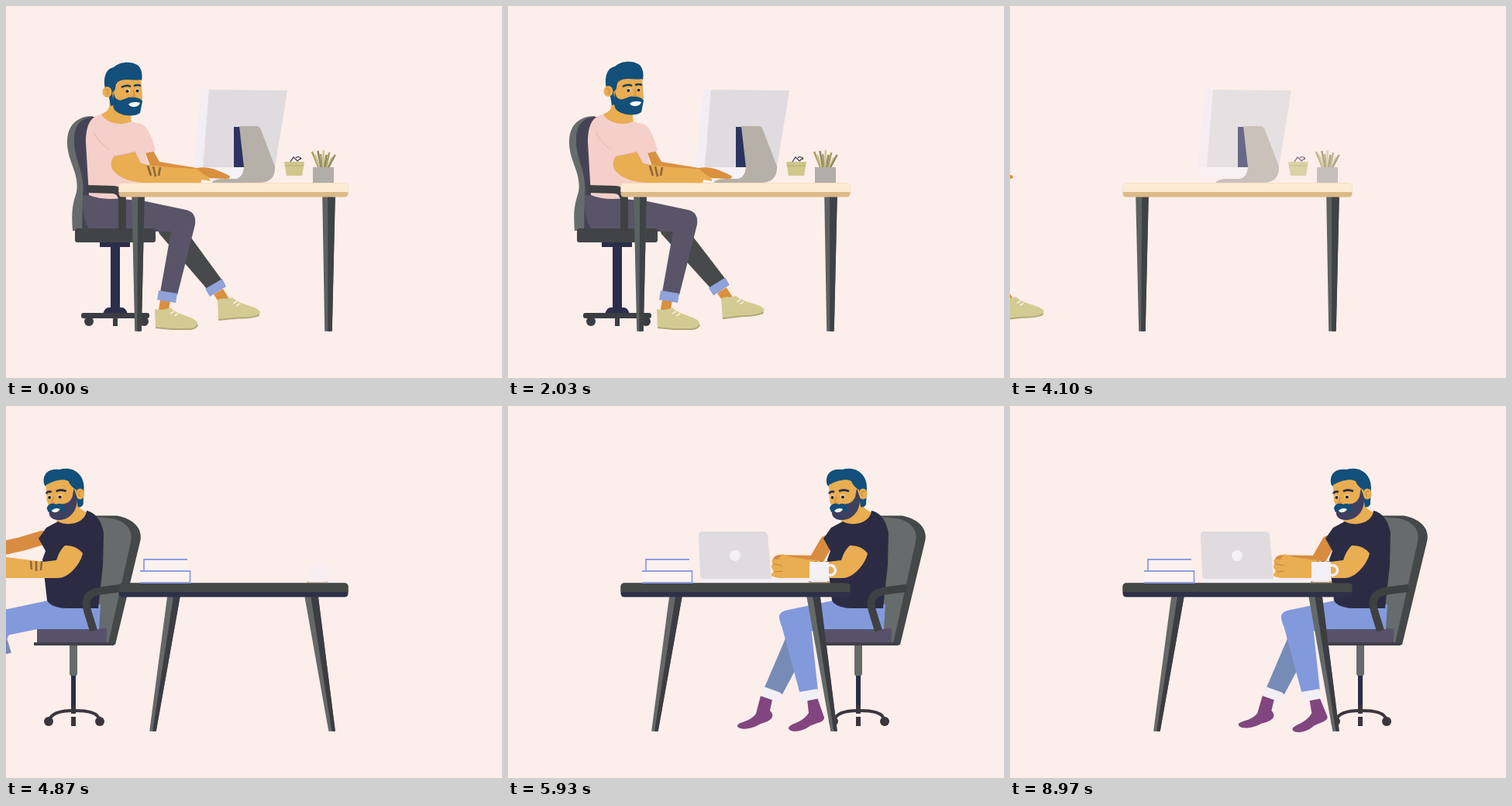
Animation of 640 by 480 pixels, one loop 9010 ms. Source, as an HTML page:

```html
<!DOCTYPE html>
<html lang="en">
<head>
<meta charset="utf-8">
<title>Two desks</title>
<style>
html, body { margin: 0; width: 100%; height: 100%; overflow: hidden; background: #fceeea; }
svg { display: block; width: 640px; height: 480px; }
</style>
</head>
<body>
<svg viewBox="0 0 640 480">
  <g id="monitor">
    <path fill="#f7f2f6" d="M242 207 H309 L304 222 H245 Z"/>
    <path fill="#f3edf4" d="M252 107 H263 L254 208 H242 Z"/>
    <path fill="#dfdbdf" d="M262 108 L363 109 L347 208 H254 Z"/>
    <path fill="#2b3460" d="M294 156 H304 L308 208 H294 Z"/>
    <path fill="#b6b0a8" d="M301 155 H324 Q328 156 329 160 L347 207 Q348 228 326 228 H265 Q268 223 282 223 H297 Q306 221 307 208 Z"/>
  </g>

  <g id="manA">
    <path fill="#666c6b" d="M112 142 C90 142 78 156 79 178 C80 202 95 216 91 240 C86 256 84 264 86 290 H104 V228 Z"/>
    <path fill="#454457" d="M112 143 C94 144 87 158 88 176 C89 202 102 214 99 244 L98 290 H120 L176 166 C174 150 152 142 112 143 Z"/>
    <g fill="#2b2e4b">
      <path d="M121 304 H160 V311 H121 Z M135 310 H147 V391 H135 Z"/>
      <path d="M125 398 Q127 389 133 389 H149 Q155 389 157 398 Z"/>
    </g>
    <g fill="#3b3d42">
      <rect x="97" y="396" width="88" height="7" rx="3"/><rect x="138" y="402" width="6" height="11"/>
      <circle cx="107" cy="407" r="6"/><circle cx="178" cy="407" r="6"/>
    </g>
    <g id="legA">
      <path fill="#48494a" d="M194 284 H228 L279 354 L260 366 L198 294 Z"/>
      <path fill="#d9903f" d="M268 372 L280 365 L288 378 L275 383 Z"/>
      <path fill="#d3cb93" d="M273 379 C279 376 286 379 292 376 C301 386 325 387 328 395 L326 401 L274 405 Z"/>
      <path fill="none" stroke="#b3a879" stroke-width="2" d="M274 405 L300 402.500 Q320 403 327 398"/>
      <path fill="none" stroke="#fbefdc" stroke-width="1.500" d="M293 384 L298 381 M297 387 L302 384"/>
      <path fill="#8fa2d9" d="M257 365 L279 352 L284 362 L263 375 Z"/>
    </g>
    <path fill="#d9903f" d="M199 379 H212 L210 392 H197 Z"/>
    <path fill="#d3cb93" d="M192 391 Q202 394 212 389 C220 399 246 401 247 409 L245 416 H193 Z"/>
    <path fill="none" stroke="#b3a879" stroke-width="2" d="M193 415 L214 417 H238 Q246 416 247 411"/>
    <path fill="none" stroke="#fbefdc" stroke-width="1.500" d="M212 397 L217 394 M217 400 L222 397"/>
    <path fill="#595468" d="M99 244 L180 252 L232 263 Q246 266 244 282 L221 373 L199 369 L213 291 H112 Q98 284 99 244 Z"/>
    <path fill="#8fa2d9" d="M197 367 L221 371 L219 383 L195 379 Z"/>
    <g id="backArmA">
      <path fill="#d9903f" d="M179 187 L190 187 L198 201 L246 209 C262 206 276 213 288 219 Q291 223 284 223 L262 222 L244 218 L188 212 Z"/>
    </g>
    <path fill="#e9ad52" d="M135 112 L133 131 C131 136 127 138 122 140 C128 152 150 156 162 150 L159 128 Z"/>
    <path fill="#f5cfca" d="M123 140 C109 142 103 154 103 176 L107 244 Q125 251 147 248 L186 230 L183 204 L180 190 L193 187 C189 170 182 153 173 152 L161 149 C150 155 130 152 123 140 Z"/>
    <path fill="none" stroke="#e2b4b0" stroke-width="1" d="M113 163 Q120 176 133 185 M144 180 Q153 179 160 188"/>
    <g id="headA">
      <path fill="#124f7a" d="M128 107 C125 92 129 81 139 79 C146 72 160 71 167 75 C174 77 177 87 175 96 L158 98 L142 101 L139 128 L135 129 L132 112 Z"/>
      <path fill="#e9ad52" d="M143 99 C151 92 162 97 174 95 C175 104 176 115 176 123 L164 134 L139 127 L137 112 C141 110 142 104 143 99 Z"/>
      <ellipse cx="130.500" cy="111" rx="6" ry="7" fill="#e9ad52"/>
      <path fill="none" stroke="#d98f3f" stroke-width="1.500" d="M128 108 C132 106 133 111 130 115"/>
      <path fill="#124f7a" d="M139 111 C140 119 144 123 150 121 L158 118 C165 117 174 118 176 123 L173 138 C165 144 147 142 140 134 C137 129 138 120 139 111 Z"/>
      <path fill="#fff6f1" d="M158 127 C162 123 169 124 173 125 C171 131 162 132 158 127 Z"/>
      <path fill="none" stroke="#173b5c" stroke-width="2.500" d="M149 105 Q155 101 161 104 M165 103 Q170 101 174 103"/>
      <g fill="#f8e6cf"><circle cx="157" cy="109.500" r="2.800"/><circle cx="169.500" cy="109" r="2.500"/></g>
      <g fill="#26242e"><circle cx="156.500" cy="110" r="2.100"/><circle cx="169.500" cy="109.500" r="2"/></g>
      <path fill="none" stroke="#d98f3f" stroke-width="1.500" d="M164 109 L166 116 L162 117"/>
    </g>
    <rect x="89" y="287" width="104" height="18" rx="3" fill="#424346"/>
    <path fill="none" stroke="#3f4042" stroke-width="10" d="M104 236 L138 237 Q150 238 150 252 V290"/>
    <g id="frontArmA">
      <path fill="#fbf4f3" d="M250 228 Q252 220 260 221 Q267 223 266 228 Z"/>
      <path fill="#e9ad52" d="M146 186 C136 195 133 204 138 212 C147 223 164 228 181 228 H240 C247 230 253 229 252 224 L263 226 Q264 221 256 218 L246 210 C222 209 194 207 174 203 L166 187 Z"/>
      <path fill="none" stroke="#8c683d" stroke-width="2.600" d="M183 206 L187 219 M190 207 L193 220 M199 208 L197 219"/>
    </g>
    <path fill="#f5cfca" d="M133 183 L140 194 L167 188 L158 172 Z"/>
    <path fill="none" stroke="#e2b4b0" stroke-width="1" d="M140 194 L167 188"/>
  </g>

  <g id="manB">
    <path fill="#454849" d="M478 141.500 L508 141.500 C531 146 542 159 538 175 L506 308 H488 Z"/>
    <path fill="#666b6b" d="M478 143 L502 145 C520 149 529 160 526 175 L497 306 H484 Z"/>
    <path fill="#666b6b" d="M447 308 H457 V346 L455 349 H449 L447 346 Z"/>
    <path fill="#2a2d48" d="M449 348 H455 V387 H449 Z"/>
    <path fill="none" stroke="#3b353c" stroke-width="4" d="M421 405 C424 395 438 393 452 393 C470 393 484 395 486 406"/>
    <g fill="#3b353c"><circle cx="420" cy="407" r="6"/><circle cx="486" cy="407" r="6"/><path d="M449 386 H455 V397 H449 Z M449 401 H455 V413 H449 Z"/></g>
    <path fill="#57526a" d="M405 287 H495 V306 H405 Z"/>
    <path fill="#423f4b" d="M401 305 H504 V309 H401 Z"/>
    <g id="calfBack">
      <g id="footBack">
        <path fill="#81467f" d="M326 374 L341 379 L338 393 C345 400 341 406 326 410 C311 419 296 418 296 412 C299 407 312 408 320 397 Z"/>
      </g>
      <path fill="#768cb6" d="M358 300 L386 312 L354 372 L331 363 Z"/>
      <path fill="#f2f0f5" d="M330 362 L352 370 L349 382 L326 374 Z"/>
    </g>
    <g id="calfFront">
      <g id="footFront">
        <path fill="#81467f" d="M386 378 L399 376 L408 402 C408 409 395 409 388 414 C378 421 362 422 362 415 C365 409 380 409 388 396 Z"/>
      </g>
      <path fill="#8299dc" d="M350 272 Q352 265 362 265 L391 284 L400 368 L377 372 Z"/>
      <path fill="#f2f0f5" d="M376 369 L399 365 L403 377 L378 382 Z"/>
    </g>
    <path fill="#8299dc" d="M350 272 Q350 265 362 263 L424 250 L487 256 L485 288 H405 L366 296 Q351 288 350 272 Z"/>
    <path id="backArmB" fill="none" stroke="#d88c40" stroke-width="18" stroke-linejoin="round" stroke-linecap="round"/>
    <path fill="#e9ad52" d="M454 112 L457 127 Q461 135 472 138 L466 154 L440 157 L430 149 L438 125 Z"/>
    <path fill="#2b2c43" d="M432 149 L417 157 L407 171 L416 187 L412 198 L418 251 Q424 262 450 261 L484 261 L490 205 L491 164 C488 145 478 137 469 135 C468 149 448 157 432 149 Z"/>
    <g id="headB">
      <path fill="#124f7a" d="M411 98 C410 87 418 80 431 82 C450 77 463 89 463 105 L462 127 Q459 132 455 130 L451 107 C446 104 441 95 434 96 C426 98 418 98 415 104 Q411 103 411 98 Z"/>
      <path fill="#e9ad52" d="M414 102 C424 96 437 93 443 97 C446 104 450 107 453 108 L453 122 L438 140 L420 136 L415 122 Z"/>
      <ellipse cx="458" cy="113.500" rx="5.500" ry="7" fill="#e9ad52"/>
      <path fill="none" stroke="#d98f3f" stroke-width="1.500" d="M460 110 C456 109 455 114 458 117"/>
      <path fill="#3d405e" d="M450 106 L454 118 C455 131 449 142 438 146 C428 149 419 146 418 139 L418 134 L430 126 C440 128 446 123 448 117 Z"/>
      <path fill="#124f7a" d="M415 132 C417 125 424 125 427 127 C433 124 439 129 439 137 L430 134 L417 137 Z"/>
      <path fill="#fff6f1" d="M421 135 Q426 130 432 133 Q430 138 423 137 Z"/>
      <path fill="none" stroke="#2b3148" stroke-width="2.800" d="M414 113 Q417 109 421 111 M427 110 Q433 107 440 110"/>
      <g fill="#f8e6cf"><circle cx="418.500" cy="117.500" r="2.500"/><circle cx="432" cy="117" r="2.800"/></g>
      <g fill="#26242e"><circle cx="418.500" cy="118" r="2"/><circle cx="432" cy="117.500" r="2.100"/></g>
      <path fill="none" stroke="#d98f3f" stroke-width="1.500" d="M424 117 L421 124 L425 125"/>
    </g>
    <g id="frontArmB">
      <path fill="#e9ad52" d="M430 199 Q434 186 441 180 Q455 179 464 190 C461 204 446 222 432 222 H350 L341 220 Q338 217 343 214 L340 208 Q339 204 344 204 L340 200 Q341 197 349 198 L354 191 L366 195 L388 198 L414 201 Z"/>
      <path fill="none" stroke="#c9843d" stroke-width="1" d="M343 204 L354 206 M343 214 L354 213"/>
      <path fill="none" stroke="#8c683d" stroke-width="2.600" d="M397 200 L398 211 M404 200 L404 213 M411 200 L410 212"/>
    </g>
    <path fill="none" stroke="#3f4042" stroke-width="10" d="M514 235 L490 238 C470 240 466 250 470 264 L478 290"/>
  </g>

  <g id="desk"></g>

  <g id="cups">
    <path fill="#cfc78c" d="M359 201 H385 L382 219 H362 Z"/>
    <path fill="none" stroke="#b4aa70" d="M360 206 H384"/>
    <path fill="none" stroke="#3d3d4e" stroke-width="1.300" d="M367 201 L371 195 L376 200 L381 196 M374 196 A3 2 0 1 1 380 198"/>
    <g id="pencils" fill="none" stroke-width="2.500"></g>
    <path fill="#b1ada8" d="M396 208 H423 V228 H396 Z"/>
  </g>

  <g id="books">
    <path fill="#fbf2f1" d="M178 198 H234 V212 H178 Z M174 213 H237 V228 H174 Z"/>
    <path fill="none" stroke="#8f9de0" stroke-width="1.800" d="M234 198 H178 V212 M173 213 H237.500 V228 H173"/>
  </g>
  <g id="laptop">
    <path fill="#f4eff3" d="M250 222 H414 V228 H250 Z"/>
    <path fill="#dfdbde" d="M251 162 H329 Q334 162 335 167 L340 223 H252 Q248 222 248 217 L246 167 Q246 162 251 162 Z"/>
    <circle cx="293" cy="193" r="7" fill="#f4f1f4"/>
  </g>
  <g id="mug">
    <path fill="#c99a68" d="M388 226 H415 V228 H388 Z"/>
    <circle cx="416" cy="212" r="6.500" fill="none" stroke="#f5eff6" stroke-width="3.500"/>
    <path fill="#f5eff6" d="M389 201 H414 V223 Q414 227 410 227 H393 Q389 227 389 223 Z"/>
  </g>
</svg>
<script>
const LOOP = 9010, NS = 'http://www.w3.org/2000/svg';
const $ = id => document.getElementById(id);
const make = (tag, parent, attrs) => {
  const el = document.createElementNS(NS, tag);
  for (const k in attrs) el.setAttribute(k, attrs[k]);
  return parent.appendChild(el);
};
const span = (t, a, b) => Math.min(1, Math.max(0, (t - a) / (b - a)));
const cubic = p => p < .5 ? 4 * p ** 3 : 1 - (2 - 2 * p) ** 3 / 2;
const sine = p => (1 - Math.cos(Math.PI * p)) / 2;
const wave = (t, period) => (1 - Math.cos(2 * Math.PI * t / period)) / 2;
const lerp = (a, b, p) => a + (b - a) * p;
const blend = (a, b, p) => a.map((v, i) => lerp(v, b[i], p));

const move = (id, x, y = 0) => $(id).setAttribute('transform', `translate(${x} ${y})`);
const turn = (id, deg, x, y) => $(id).setAttribute('transform', `rotate(${deg} ${x} ${y})`);
const show = (id, on) => { $(id).style.display = on ? '' : 'none'; };
const fade = (id, o) => {
  $(id).setAttribute('opacity', o);
  show(id, o > 0);
};

for (let i = 0; i < 9; i++) {
  const x = 395 + i * 3.7, top = 184 + (i * 5 % 9) + Math.abs(i - 4);
  make('path', $('pencils'), {
    d: `M${404 + i * 1.4} 210 L${x} ${top}`,
    stroke: ['#a79f62', '#cdc490', '#8d8967'][i % 3]
  });
}

// Desk pieces: both outlines and both colours.
const leg = (l, r, bl, br) => [l, 245, r, 245, br, 419, bl, 419];
const pieces = [
  [leg(163, 178, 167, 174), leg(209, 224, 186, 193), [92, 98, 98], [100, 105, 103]],
  [leg(171, 178, 170, 174), leg(217, 224, 190, 193), [63, 67, 69], [60, 61, 67]],
  [leg(409, 424, 412, 420), leg(386, 402, 417, 424), [92, 98, 98], [100, 105, 103]],
  [leg(416, 424, 416, 420), leg(394, 402, 421, 424), [63, 67, 69], [60, 61, 67]]
].map(([a, b, ca, cb]) => ({
  a, b, ca, cb,
  el: make('polygon', $('desk'), { 'stroke-linejoin': 'round', 'stroke-width': 1.6 })
}));
const edge = make('rect', $('desk'), { x: 145.5, y: 228.5, width: 296, height: 18, rx: 4.5 });
const board = make('path', $('desk'), { d: 'M150 228.5 H437 Q441.5 228.5 441.5 233 V240 H145.5 V233 Q145.5 228.5 150 228.5 Z' });
const rgb = c => `rgb(${c.map(Math.round)})`;

function drawDesk(p) {
  for (const { el, a, b, ca, cb } of pieces) {
    const c = rgb(blend(ca, cb, p));
    el.setAttribute('points', blend(a, b, p).join(' '));
    el.setAttribute('fill', c);
    el.setAttribute('stroke', c);
  }
  edge.setAttribute('fill', rgb(blend([220, 186, 136], [46, 48, 72], p)));
  board.setAttribute('fill', rgb(blend([253, 235, 212], [69, 72, 70], p)));
}

function drawA(t) {
  show('manA', t < 4400);
  move('manA', -360 * cubic(span(t, 3650, 4370)));
  const nod = wave(t, 4000);
  move('headA', -nod, -nod);
  turn('legA', -1.6 * wave(t, 850), 205, 290);
  turn('backArmA', -1.2 * wave(t, 410), 185, 195);
  turn('frontArmA', .5 * wave(t, 340), 145, 205);
  const o = 1 - span(t, 4000, 4350);
  fade('monitor', o);
  fade('cups', o);
}

function drawB(t) {
  show('manB', t >= 4680);
  move('manB', -545 * (1 - sine(span(t, 4680, 5170))));
  const settle = sine(span(t, 4950, 5400)), reach = 1 - settle;
  move('headB', 4 * wave(t - 6730, 4500) - 1.1);
  const tap = Math.sin(2 * Math.PI * (t - 5930) / 914) * settle;
  turn('footFront', -3.6 * tap, 392, 372);
  turn('footBack', 2.5 * wave(t - 5930, 914) * settle, 340, 372);
  turn('calfFront', 82 * reach, 366, 279);
  turn('calfBack', 50 * reach, 372, 300);
  const key = 1 - wave(t - 5930, 615);
  const pts = blend([412, 170, 385, 178, 350, 186], [411, 176, 396, 202, 350, 206 - 5 * key], settle);
  $('backArmB').setAttribute('d', `M${pts[0]} ${pts[1]} L${pts[2]} ${pts[3]} L${pts[4]} ${pts[5]}`);
  turn('frontArmB', (1.2 * key - 1.2) * settle, 445, 205);
  fade('books', span(t, 4400, 4600));
  fade('mug', span(t, 4740, 5000));
  fade('laptop', span(t, 4890, 5250));
}

const start = performance.now();
function tick(now) {
  const t = Math.max(0, now - start) % LOOP;
  drawDesk(sine(span(t, 4280, 4630)));
  drawA(t);
  drawB(t);
  requestAnimationFrame(tick);
}
tick(start);
</script>
</body>
</html>
```
